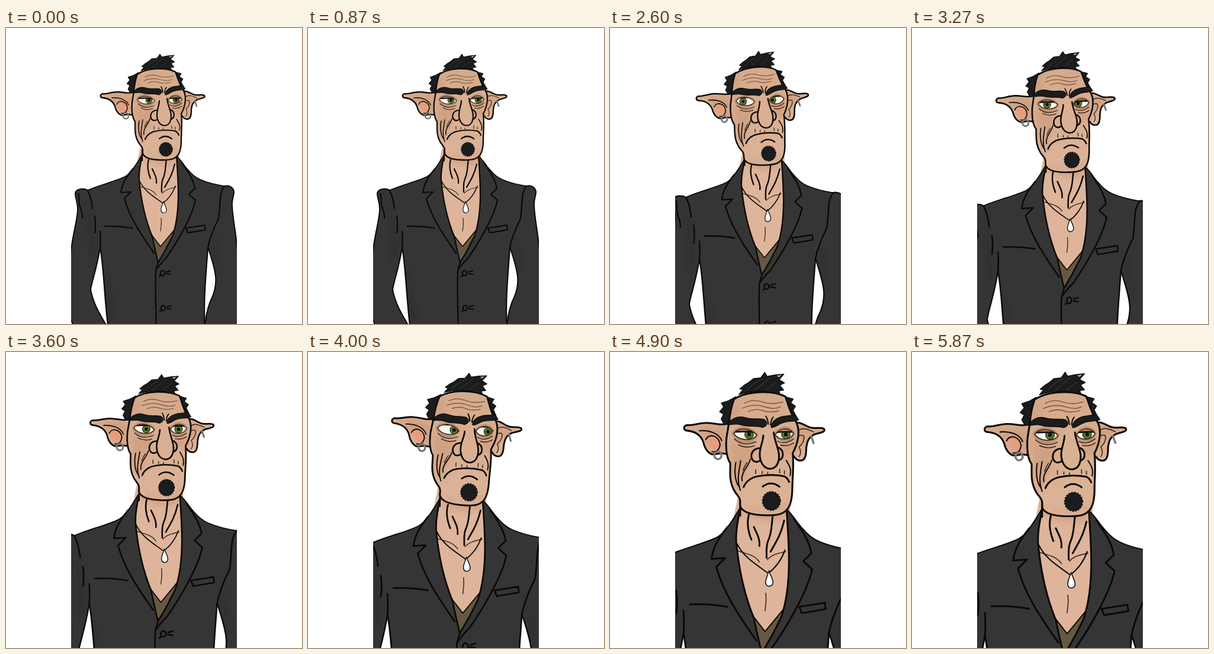
Write an HTML page that moves like this. It is 500 by 500 pixels and loops after 6010 ms.

```html
<!DOCTYPE html>
<html lang="en">
<head>
<meta charset="utf-8">
<title>Grumpy goblin</title>
<style>
  html, body { margin: 0; width: 100%; height: 100%; overflow: hidden; background: #fff; }
  svg { display: block; width: 100vw; height: 100vh; }
  path, ellipse, circle { stroke-linecap: round; stroke-linejoin: round; }
  .ink { fill: none; stroke: #0b0908; stroke-width: 2.2; }
  .thin { stroke-width: 1.5; }
  .fine { fill: none; stroke: #39251b; stroke-width: 1.2; }
  .crease { fill: none; stroke: #8a5a43; stroke-width: 1.2; }
  .skin { fill: url(#skinTone); stroke: #0b0908; stroke-width: 2.3; }
  .coat { fill: #353535; stroke: #0b0908; stroke-width: 2; }
  .cloth { fill: #353535; }
  .hair { fill: #1b1c1d; stroke: #0b0b0b; stroke-width: 1; }
  .blush { fill: #b0704f; opacity: .22; filter: url(#soft); }
  .shade { fill: #141414; opacity: .2; filter: url(#soft); }
  .metal { fill: none; stroke: #777; stroke-width: 2.6; }
</style>
</head>
<body>
<svg viewBox="0 0 500 500">
  <defs>
    <clipPath id="stage"><rect x="110" y="0" width="280" height="500"/></clipPath>
    <clipPath id="leftEye"><path id="leftShape" d="M222,121 C227,113 243,113 251,123 C245,131 228,130 222,121Z"/></clipPath>
    <clipPath id="rightEye"><path id="rightShape" d="M274,122 C279,113 291,112 297,120 C293,129 280,130 274,122Z"/></clipPath>
    <linearGradient id="skinTone" x1="0" y1="0" x2="0" y2="1">
      <stop offset="0" stop-color="#d4aa8b"/><stop offset=".5" stop-color="#d9af91"/><stop offset="1" stop-color="#dcb499"/>
    </linearGradient>
    <filter id="soft" x="-50%" y="-50%" width="200%" height="200%"><feGaussianBlur stdDeviation="4"/></filter>
  </defs>
  <g clip-path="url(#stage)">
    <g id="body">
      <!-- sleeves -->
      <path class="coat" d="M140,276 C134,270 119,270 117,279 C117,290 122,295 121,309 C119,332 111,355 109,385 L100,450 103,482 112,498 112,515 176,515 C166,493 149,474 143,442 C145,428 153,408 159,371 L162,310Z"/>
      <path class="coat" d="M360,274 C365,263 384,264 385,277 C385,285 381,290 382,300 C383,325 389,347 390,370 L402,420 392,510 335,515 C336,490 340,471 349,453 C358,430 356,415 341,370 L346,320Z"/>

      <!-- neck, chest and undershirt -->
      <path fill="#deb59b" d="M229,190 L222,225 218,262 228,322 240,354 253,402 265,396 290,342 300,300 298,262 293,225 291,190Z"/>
      <path class="blush" d="M231,205 L289,212 288,229 C268,234 246,232 232,222Z"/>
      <path fill="#665843" d="M240,342 L261,369 290,334 290,350 262,402 250,402Z"/>
      <path class="ink thin" d="M244,347 L261,369 285,340"/>
      <path class="ink" d="M230,206 L230,224 M241,222 C238,232 240,244 244,254 M247,238 C251,247 255,253 254,262 M271,222 C269,234 270,245 265,255 C262,262 263,270 263,277 M285,230 C281,247 276,255 268,269"/>
      <path class="fine thin" d="M227,268 C239,272 248,273 254,282 M287,269 C277,271 269,273 264,279 M262,321 C263,330 262,336 261,343"/>
      <path class="ink thin" d="M226,259 C234,276 250,285 265,296 C273,290 281,281 286,267"/>
      <path fill="#fff" stroke="#111" stroke-width="1.2" d="M266,293 C264,300 261,304 262,309 C264,314 270,313 271,308 C271,303 268,299 266,293Z"/>

      <!-- jacket fronts -->
      <path class="cloth" d="M231,212 C225,222 221,229 215,237 Q208,247 201,251 C185,259 158,265 138,274 C149,288 151,330 159,371 C165,400 166,455 173,510 L258,510 253,410 257,396 C254,384 251,372 247,352 C238,330 229,300 225,257 C224,243 227,228 231,212Z"/>
      <path class="cloth" d="M288,216 C297,224 301,233 308,240 Q317,251 328,256 C342,262 356,265 369,267 C359,280 363,296 359,322 C350,340 344,355 341,371 C338,415 333,460 336,510 L253,510 253,410 257,396 Q270,375 281,352 C287,335 291,310 291,280 C291,262 290,245 288,216Z"/>
      <path class="shade" d="M134,287 C142,300 149,340 151,375 L144,400 C143,365 141,319 134,287Z M167,400 L174,500 184,500 C178,460 173,430 167,400Z M352,345 L349,378 359,420 C358,400 355,373 352,345Z"/>
      <path class="ink thin" d="M231,212 C225,222 221,229 215,237 Q208,247 201,251 C185,259 158,265 138,274 M288,216 C297,224 301,233 308,240 Q317,251 328,256 C342,262 356,265 369,267"/>

      <!-- lapels and seams -->
      <path class="ink" d="M231,212 C227,228 224,243 225,257 C229,300 238,330 247,352 C251,372 254,384 257,396 M288,216 C290,245 291,262 291,280 C291,310 287,335 281,352 Q270,375 257,396 L253,410 Q252,440 254,510"/>
      <path class="ink" d="M214,238 C203,252 196,263 194,278 L211,277 200,288 C208,318 226,346 250,380 M297,227 C306,242 316,253 319,271 L309,281 320,291 C314,320 287,365 270,389 Q260,399 254,408"/>
      <path class="ink" d="M167,335 Q191,334 214,338 M304,338 L336,333 337,341 307,346Z"/>
      <path class="ink" d="M122,280 C125,284 122,294 125,302 Q130,315 129,321 M138,275 C143,284 145,295 146,305 M150,318 Q152,333 150,346 M159,343 Q160,360 159,371 C165,400 166,455 173,510 M369,267 C359,280 363,296 359,322 C350,340 344,355 341,371 C338,415 333,460 336,510"/>
      <g id="button" class="ink"><ellipse cx="264.500" cy="414" rx="3.600" ry="4.300"/><path d="M261,418 L259,420 M271,412 L278,410 M271,415 L278,416"/></g>
      <use href="#button" x="1" y="59"/>
    </g>

    <g id="head">
      <!-- ears -->
      <path class="skin" d="M297,108 C303,104 309,109 316,112 C323,115 330,111 335,114 C338,118 329,119 323,121 C316,125 314,129 313,138 C313,147 312,154 306,154 C300,154 299,150 296,147Z"/>
      <path class="blush" d="M300,113 L321,117 307,133 303,151Z"/>
      <path class="fine" d="M302,117 C309,111 317,116 322,118 M304,123 C314,119 310,132 304,137 C307,142 306,147 304,149"/>
      <path class="metal" d="M319,123 L322,132"/>
      <path class="skin" d="M217,108 C205,112 200,108 188,108 C178,108 170,112 163,111 C158,113 159,118 164,118 C175,119 181,124 184,132 C186,142 193,149 199,147 C205,146 209,145 217,148Z"/>
      <path class="blush" d="M176,113 L212,116 214,145 195,143Z"/>
      <path fill="#e79d7c" d="M190,131 C193,121 205,125 205,135 C203,146 193,141 190,131Z"/>
      <path class="ink thin" d="M179,118 C190,117 203,120 207,130 M187,129 C191,120 204,124 205,135 C204,143 199,145 195,144"/>

      <!-- skull and jaw -->
      <path class="hair" d="M224,75 L215,80 206,83 209,88 204,94 209,97 206,103 210,110 218,108 224,100Z M281,73 L296,77 293,82 299,86 296,91 300,99 289,101Z"/>
      <path class="skin" d="M222,78 C238,67 270,66 286,74 C290,83 291,92 299,104 C306,115 303,132 296,145 C298,160 296,177 296,190 Q296,202 293,210 C288,222 278,223 264,223 C246,223 234,220 231,212 C231,205 231,202 228,199 C221,191 218,181 218,171 L218,158 C213,151 212,139 213,126 L216,107 C217,96 219,86 222,78Z"/>
      <path class="blush" d="M218,126 C230,139 242,137 249,132 L240,162 231,193 221,174Z M280,129 C293,133 299,125 301,118 L294,151 283,145Z"/>
      <path class="blush" d="M222,86 L228,80 227,100 218,107Z M236,208 C252,220 282,219 294,203 L290,216 264,220 243,218Z"/>
      <path class="hair" d="M228,72 L233,66 229,65 235,60 240,57 246,52 255,51 260,44 263,49 273,47 284,46 278,53 285,57 279,60 284,66 278,67 280,72 C263,66 244,67 228,72Z"/>
      <path d="M275,48 L281,47 278,50Z" fill="#aeb2b6"/>
      <path fill="none" stroke="#3a3c3e" stroke-width=".8" d="M238,66 Q247,57 257,52 M248,66 Q258,58 266,51 M262,66 Q269,60 274,57"/>

      <!-- forehead -->
      <path class="crease" d="M235,83 Q245,77 257,81 T283,81 M233,89 Q247,83 260,87 T280,87 M240,93 Q251,89 258,92 T278,92"/>
      <path class="ink thin" d="M262,99 Q265,104 265,109 M271,100 Q268,104 268,110"/>

      <!-- eyes -->
      <path fill="#a87258" opacity=".5" d="M219,121 C224,109 244,109 253,122 C247,137 226,136 219,121Z M272,122 C278,109 292,108 299,119 C297,133 280,135 272,122Z"/>
      <g clip-path="url(#leftEye)">
        <use href="#leftShape" fill="#f7f6ee"/>
        <g class="iris"><circle cx="238" cy="122" r="5.400" fill="#557d2c" stroke="#24350f"/><circle cx="238" cy="122" r="2.400" fill="#111"/></g>
        <path class="lid" d="M215,95 H256 V120 Q236,117 215,120Z" fill="#b98b6e" stroke="#0b0908" stroke-width="2"/>
      </g>
      <g clip-path="url(#rightEye)">
        <use href="#rightShape" fill="#f7f6ee"/>
        <g class="iris"><circle cx="284" cy="121.500" r="5.400" fill="#557d2c" stroke="#24350f"/><circle cx="284" cy="121.500" r="2.400" fill="#111"/></g>
        <path class="lid" d="M268,95 H303 V119 Q287,117 268,120Z" fill="#b98b6e" stroke="#0b0908" stroke-width="2"/>
      </g>
      <use href="#leftShape" class="fine thin"/><use href="#rightShape" class="fine thin"/>
      <path class="fine" d="M223,128 Q234,138 250,131 M228,135 Q238,140 248,136 M277,130 Q286,135 297,127 M281,135 Q290,137 297,132"/>

      <!-- brows -->
      <g id="brows" class="hair">
        <path d="M214,110 C218,103 226,98 236,101 C246,104 252,101 260,103 C265,106 264,111 258,113 C250,110 241,113 231,110 C224,108 219,110 214,110Z"/>
        <path d="M269,113 C268,106 275,101 283,99 C290,98 296,97 299,97 L303,103 C296,106 290,104 283,107 C277,109 274,113 269,113Z"/>
      </g>

      <!-- nose -->
      <path fill="#dab093" d="M260,114 C257,128 251,140 255,154 C260,168 275,167 279,153 C280,140 272,127 270,114Z"/>
      <path class="ink" d="M259,123 C259,132 252,143 256,154 C260,168 275,168 278,156 C282,144 273,132 272,119 M254,139 C244,140 242,150 247,155 Q251,158 256,154 M278,138 C285,141 286,151 279,154"/>

      <!-- mouth and cheeks -->
      <path class="ink" d="M235,188 C238,180 246,175 254,174 Q270,171 286,174 Q290,176 292,181 M259,187 Q269,179 280,187"/>
      <path class="ink thin" d="M243,153 C241,163 231,169 233,180 M231,155 C229,169 226,179 231,192 M225,157 C223,168 224,180 229,187 M288,154 C292,160 295,165 293,173"/>
      <path class="fine" d="M250,166 V171 M258,168 V171 M265,169 V172 M280,165 V170 M286,167 V171 M239,157 Q235,164 234,167"/>
      <ellipse class="hair" cx="270" cy="205" rx="10.500" ry="11"/>
      <ellipse cx="270" cy="205" rx="11" ry="11.500" fill="none" stroke="#1b1c1d" stroke-width="2" stroke-dasharray=".6 3"/>

      <!-- hoop -->
      <ellipse class="metal" cx="202.500" cy="148.500" rx="4.500" ry="4.800"/>
    </g>
  </g>
</svg>
<script>
const LOOP = 6010;
// time, zoom, body x, body y, chin x, chin y, head tilt, gaze, lid lift
const poses = [
  [1870, 1,     0,   0,     270, 205, 0,    3.5, 0],
  [2600, 1.076, -20, -9,    268, 212, -2.1, -5,  2.6],
  [3270, 1.14,  -36, -12,   270, 223, -1.2, -3,  0.3],
  [4000, 1.247, -64, -19,   272, 237, 3.6,  6.5, 3.2],
  [4470, 1.312, -81, -24,   272, 247, 2.5,  4,   0.4],
  [5200, 1.36,  -93, -26,   273, 253, -0.2, 3,   0]
];

const byId = id => document.getElementById(id);
const body = byId("body"), head = byId("head"), brows = byId("brows");
const irises = document.querySelectorAll(".iris");
const lids = document.querySelectorAll(".lid");

// Tangents vanish at the ends and wherever a value turns around.
function slope(i, k) {
  if (i === 0 || i === poses.length - 1) return 0;
  const [a, b, c] = [poses[i - 1], poses[i], poses[i + 1]];
  const before = (b[k] - a[k]) / (b[0] - a[0]);
  const after = (c[k] - b[k]) / (c[0] - b[0]);
  return before * after > 0 ? 2 * before * after / (before + after) : 0;
}

function poseAt(time) {
  const last = poses.length - 1;
  if (time <= poses[0][0]) return poses[0];
  if (time >= poses[last][0]) return poses[last];
  const i = poses.findIndex(p => p[0] > time) - 1;
  const a = poses[i], b = poses[i + 1];
  const span = b[0] - a[0], u = (time - a[0]) / span;
  const ease = u * u * (3 - 2 * u);
  return a.map((v, k) => v + (b[k] - v) * ease
    + span * u * (1 - u) * ((1 - u) * slope(i, k) - u * slope(i + 1, k)));
}

function draw(time) {
  const [, zoom, x, y, chinX, chinY, tilt, gaze, lift] = poseAt(time);
  body.setAttribute("transform", `translate(${x} ${y}) scale(${zoom})`);
  head.setAttribute("transform",
    `translate(${chinX} ${chinY}) rotate(${tilt}) scale(${zoom}) translate(-270 -205)`);
  irises.forEach(el => el.setAttribute("transform", `translate(${gaze} 0)`));
  lids.forEach(el => el.setAttribute("transform", `translate(0 ${-lift})`));
  brows.setAttribute("transform", `translate(0 ${lift * 0.3})`);
}

const start = performance.now();
function tick() {
  draw((performance.now() - start) % LOOP);
  requestAnimationFrame(tick);
}
tick();
</script>
</body>
</html>
```
